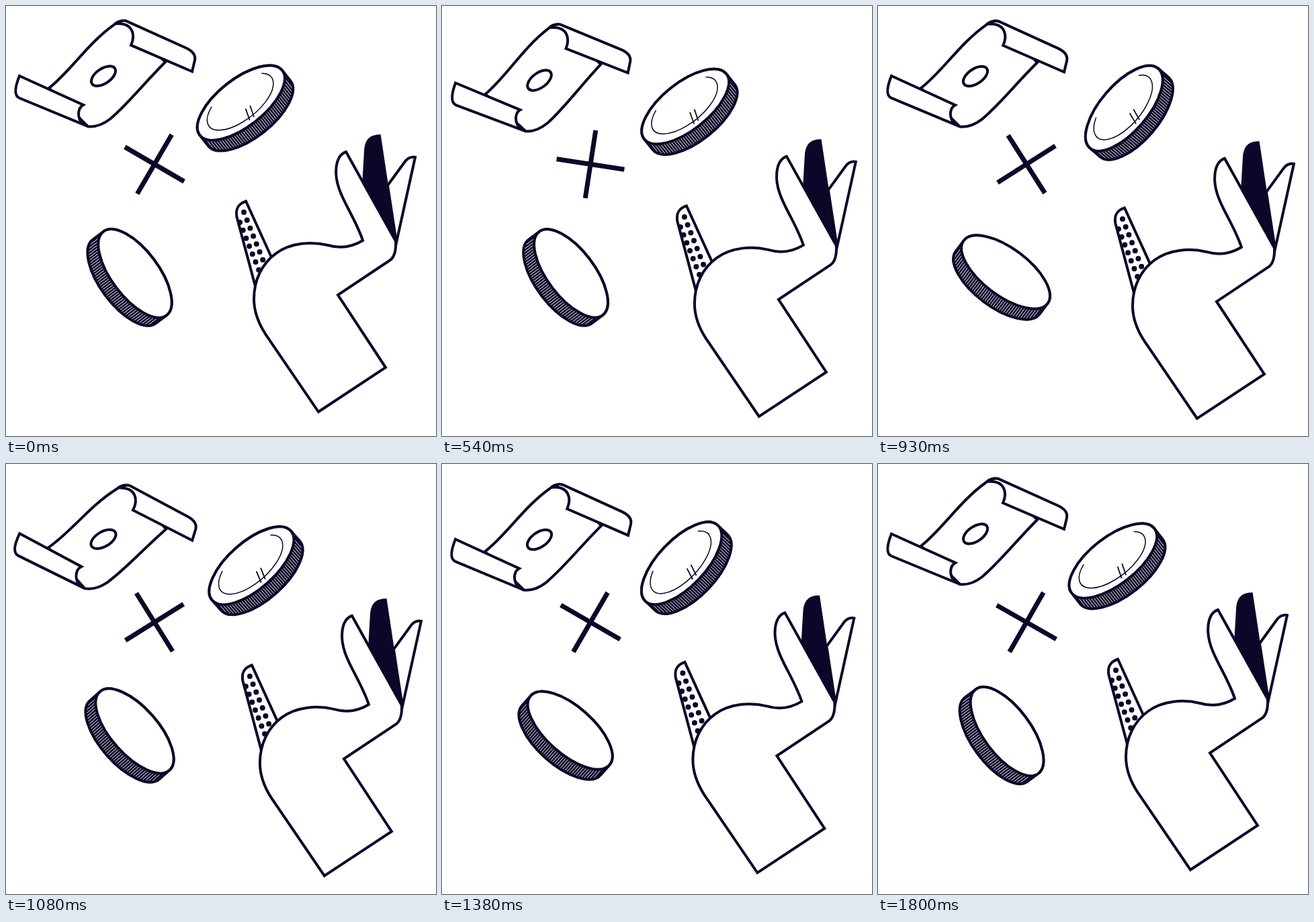
Write an HTML page with a canvas that moves like this. It is 640x640 px and loops after 1830 ms.

```html
<!DOCTYPE html>
<html lang="en">
<head>
<meta charset="utf-8">
<title>Hand, coins and note</title>
<style>
html, body { margin: 0; width: 100%; height: 100%; overflow: hidden; background: #fff; }
canvas { display: block; width: 100vw; height: 100vh; }
</style>
</head>
<body>
<canvas id="stage" width="640" height="640"></canvas>
<script>
const ctx = document.getElementById('stage').getContext('2d');
const INK = '#0d0628', PAPER = '#fff';
const STEP = 30, STEPS = 61, TAU = Math.PI * 2;

const ease = x => (1 - Math.cos(Math.PI * x)) / 2;
const swing = x => (1 - Math.cos(TAU * x)) / 2;
const mix = (a, b, k) => a + (b - a) * k;

// Eased passage through evenly spaced values, x in 0..1
function keys(x, vals) {
  const s = x * (vals.length - 1);
  const i = Math.min(Math.floor(s), vals.length - 2);
  return mix(vals[i], vals[i + 1], ease(s - i));
}

function placed(x, y, deg, draw) {
  ctx.save();
  ctx.translate(x, y);
  ctx.rotate(deg * Math.PI / 180);
  draw();
  ctx.restore();
}

function shape(path, fill, width = 4) {
  if (fill) {
    ctx.fillStyle = fill;
    ctx.fill(path);
  }
  ctx.strokeStyle = INK;
  ctx.lineWidth = width;
  ctx.stroke(path);
}

const oval = (x, y, rx, ry, rot = 0, from = 0, to = TAU) => {
  const p = new Path2D();
  p.ellipse(x, y, rx, ry, rot, from, to);
  return p;
};

// ---- coins: long axis along x, milled edge towards +y
const RX = 78, RY = 35, HALF = 10;
const coinFace = oval(0, -HALF, RX, RY);
const coinBody = new Path2D();
coinBody.ellipse(0, HALF, RX, RY, 0, 0, Math.PI);
coinBody.ellipse(0, -HALF, RX, RY, 0, Math.PI, TAU);
coinBody.closePath();

const milling = new Path2D();
for (let x = -RX; x <= RX; x += 3.6) {
  milling.moveTo(x, -HALF);
  milling.lineTo(x, RY + HALF);
}
const shine = oval(0, -12, 59, 27, 0, -Math.PI / 6, Math.PI * 1.28);
const ticks = new Path2D('M0 1L-6 18.5M8 1.5L2 18.5');

function coin(marked) {
  ctx.fillStyle = INK;
  ctx.fill(coinBody);
  ctx.save();
  ctx.clip(coinBody);
  ctx.strokeStyle = PAPER;
  ctx.lineWidth = 0.9;
  ctx.stroke(milling);
  ctx.restore();
  shape(coinBody);
  shape(coinFace, PAPER);
  if (marked) {
    shape(shine, null, 1.5);
    shape(ticks, null, 1.8);
  }
}

// ---- banknote
const sheet = new Path2D('M64 122C95 98 122 55 160 28Q168 20 178 22L237 83C205 115 182 145 155 168Q138 181 122 179Z');
const topRoll = new Path2D('M166 26Q172 20 179 22L268 62Q283 69 281 80L277 97L186 58C193 42 188 25 166 26Z');
const lowRoll = new Path2D('M20 104L115 147C104 153 106 174 122 179L20 137C13 134 12 124 20 104Z');
const seal = oval(145, 104, 20.5, 11, -0.6);

function note() {
  ctx.translate(-145, -104);
  shape(sheet, PAPER);
  shape(topRoll, PAPER);
  shape(lowRoll, PAPER);
  shape(seal);
}

// ---- hand
const dotted = new Path2D('M371 417L343.5 314C341 300 347 294 357 290.5L396 376Z');
const ring = new Path2D('M568 267L592 234Q599 223 609 225L581 352Z');
const middle = new Path2D('M531 262L534 212C536 197 544 192 557 192L581 352Z');
const palm = new Path2D(
  'M465 604L565 538L494 430L572 378Q581 371 580 350L506 217' +
  'C497 220 493 228 491.5 240C489 262 499 282 510 303C520 322 526 334 531 349' +
  'C513 360 496 361 479 356C455 350 424 352 402 368' +
  'C381 383 369 408 369 436C369 456 377 474 386 488Z');

const dots = new Path2D();
for (let i = 0; i < 8; i++) {
  for (const [x, y] of [[354, 307], [348, 322]]) {
    const cx = x + i * 4.7, cy = y + i * 11.8;
    dots.moveTo(cx + 4, cy);
    dots.arc(cx, cy, 4, 0, TAU);
  }
}

function hand() {
  ctx.fillStyle = PAPER;
  ctx.fill(dotted);
  ctx.save();
  ctx.clip(dotted);
  ctx.fillStyle = INK;
  ctx.fill(dots);
  ctx.restore();
  shape(dotted);
  shape(ring, PAPER);
  shape(middle, INK, 1.5);
  shape(palm, PAPER);
}

function cross() {
  ctx.fillStyle = INK;
  ctx.fillRect(-51, -3.5, 102, 7);
  ctx.fillRect(-3.5, -51, 7, 102);
}

function render(ms) {
  const p = (Math.floor(ms / STEP) % STEPS + 1) / STEPS;
  const drift = swing(p), rock = swing(p * 3), half = p * 2 % 1;
  const lift = half < 1 / 3 ? ease(half * 3) : 1 - ease((half * 3 - 1) / 2);

  ctx.fillStyle = PAPER;
  ctx.fillRect(0, 0, 640, 640);
  placed(145, 104 + 11 * lift, keys(half, [0, 5.4, -2.1, 0]), note);
  placed(356 + 18 * drift, 152 + 8 * drift - 1.2 * rock, mix(-38, -50, rock), () => coin(true));
  placed(184, 404, mix(53.5, 36, rock), () => coin(false));
  placed(221, 235.5, 29.7 + 720 * ease(p), cross);
  placed(10 * drift, 10 * drift, 0, hand);
}

function tick() {
  render(performance.now());
  requestAnimationFrame(tick);
}
tick();
</script>
</body>
</html>
```
